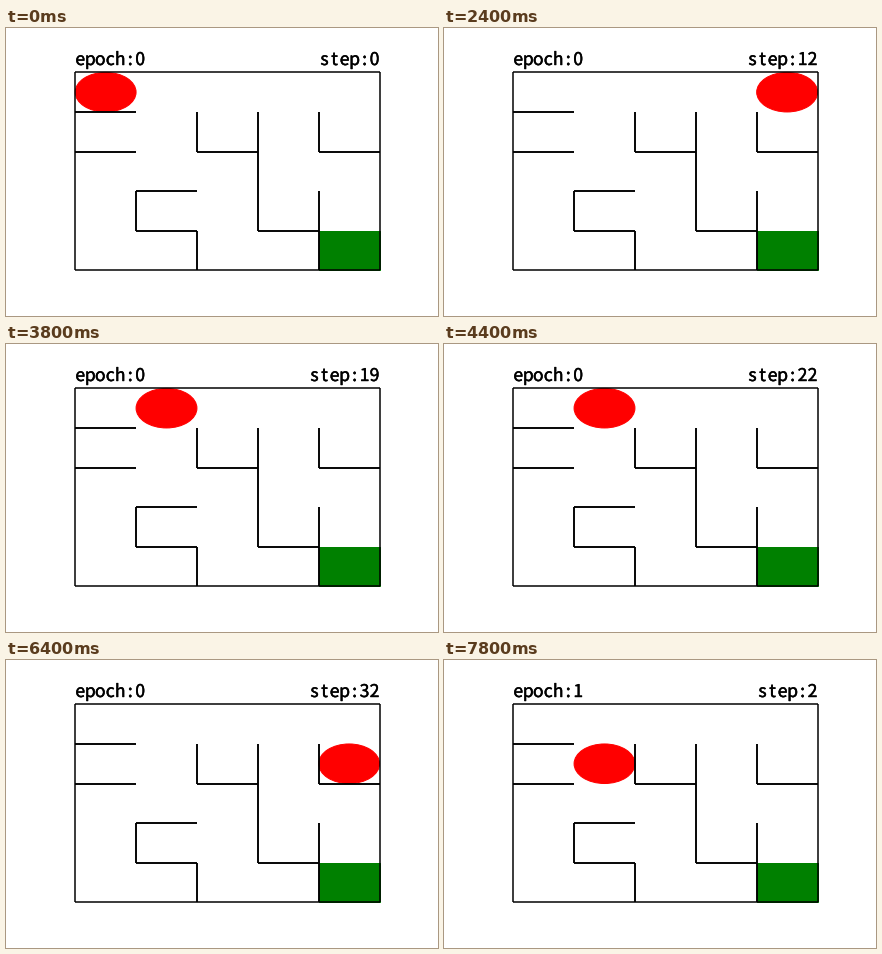
These frames come from a looping animation (432x288 px, 8000 ms). A matplotlib script:

```python
import matplotlib.pyplot as plt
from matplotlib.animation import FuncAnimation
from matplotlib.patches import Ellipse, Rectangle
from matplotlib.patheffects import withStroke

W, H, DPI = 432, 288, 72
LEFT, TOP = 69.2, 44.4          # maze corner in pixels
CELL_W, CELL_H = 60.87, 39.56
SIZE = 5                        # cells per side
PITCH = 10                      # width of one character slot

MOVES = {"R": (1, 0), "L": (-1, 0), "U": (0, -1), "D": (0, 1), ".": (0, 0)}

# One walk per epoch; a dot means the agent bumped into a wall
EPOCHS = ["..R.R.RRD.U.LD.UL.LD.UL.RRRRD...ULD.", "RD"]

# Walls as pen strokes: starting corner and directions
WALLS = [(0, 1, "R"), (0, 2, "R"), (2, 1, "DR"), (3, 1, "DDDR"),
         (4, 1, "DR"), (4, 3, "DD"), (2, 3, "LDRD")]
BORDER = (0, 0, "".join(side * SIZE for side in "RDLU"))


def to_px(col, row):
    return LEFT + col * CELL_W, TOP + row * CELL_H


def walk(col, row, moves):
    """All grid points visited from a start by a string of moves."""
    points = [(col, row)]
    for move in moves:
        dx, dy = MOVES[move]
        col, row = col + dx, row + dy
        points.append((col, row))
    return points


STATES = [(epoch, step, col, row)
          for epoch, moves in enumerate(EPOCHS)
          for step, (col, row) in enumerate(walk(0, 0, moves))]

fig = plt.figure(figsize=(W / DPI, H / DPI), dpi=DPI, facecolor="white")
ax = fig.add_axes([0, 0, 1, 1])
ax.set_xlim(0, W)
ax.set_ylim(H, 0)
ax.axis("off")


def draw_stroke(col, row, moves, width):
    points = [to_px(*p) for p in walk(col, row, moves)]
    for (xa, ya), (xb, yb) in zip(points, points[1:]):
        ax.plot([xa, xb], [ya, yb], color="black", lw=width,
                solid_capstyle="butt")


def make_label(size, x):
    """A row of fixed-pitch character slots starting at x."""
    heavier = [withStroke(linewidth=0.45, foreground="black")]
    return [ax.text(x + (i + 0.5) * PITCH, 37, "", ha="center", va="baseline",
                    fontsize=17.5, family="Noto Sans CJK JP", color="black",
                    path_effects=heavier)
            for i in range(size)]


def set_label(slots, text):
    for slot, char in zip(slots, text):
        slot.set_text(char)


ax.add_patch(Rectangle(to_px(SIZE - 1, SIZE - 1), CELL_W, CELL_H,
                       color="green", lw=1))
ball = ax.add_patch(Ellipse(to_px(0.5, 0.5), CELL_W, CELL_H,
                            color="red", lw=1))
draw_stroke(*BORDER, 1.5)
for wall in WALLS:
    draw_stroke(*wall, 1.9)
epoch_label = make_label(7, LEFT)
step_label = make_label(7, LEFT + SIZE * CELL_W - 7 * PITCH)


def update(i):
    epoch, step, col, row = STATES[i]
    ball.set_center(to_px(col + 0.5, row + 0.5))
    set_label(epoch_label, f"epoch:{epoch}")
    set_label(step_label, f"step:{step}".rjust(7))
    return [ball, *epoch_label, *step_label]


anim = FuncAnimation(fig, update, frames=len(STATES), interval=200,
                     init_func=lambda: update(0), repeat=True,
                     repeat_delay=0, blit=False)
plt.show()
```
